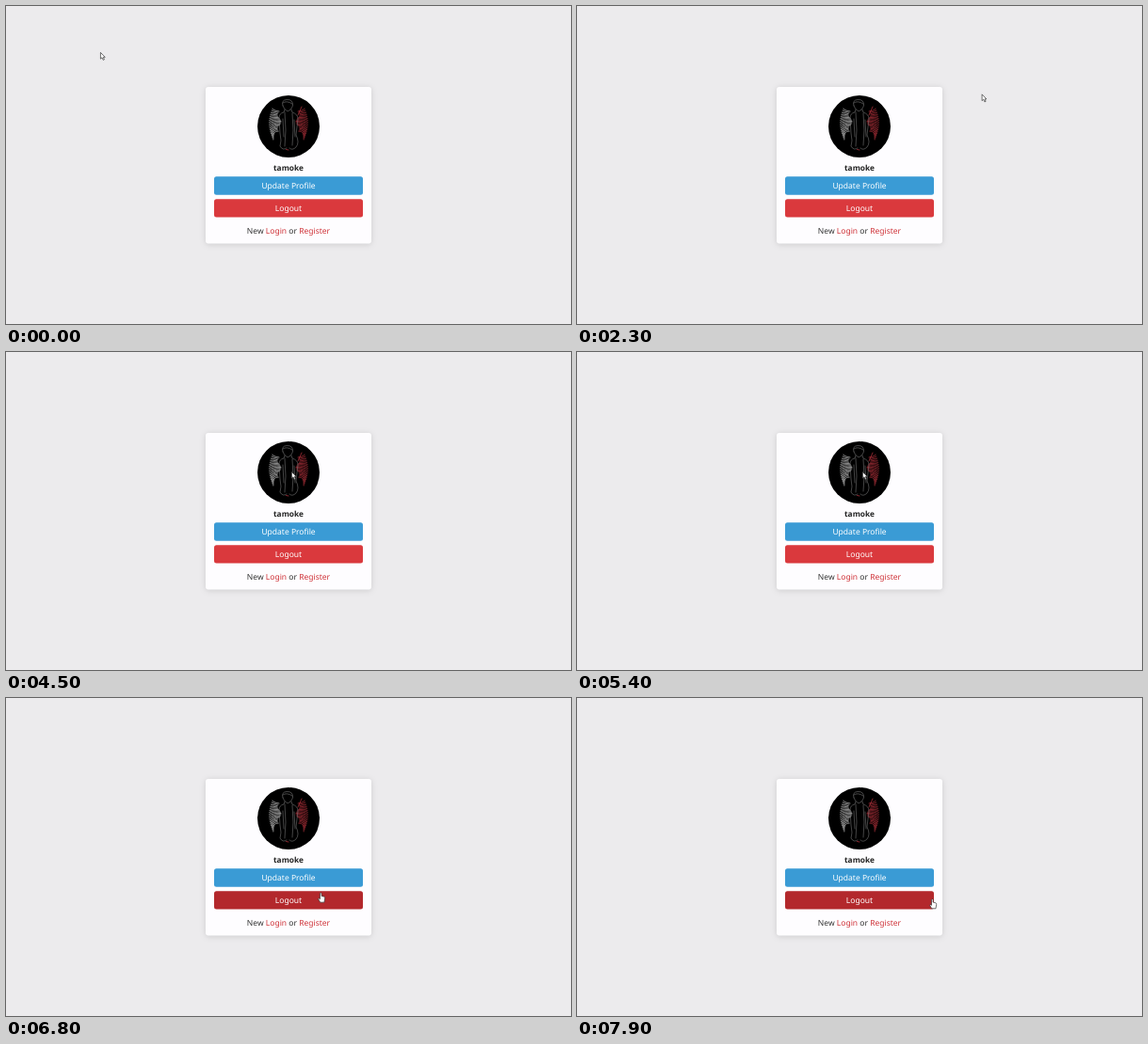
An HTML page for the animation above (8000 ms loop, 600 by 338 pixels).

```html
<!DOCTYPE html>
<html lang="en">
<head>
<meta charset="utf-8">
<title>Profile card</title>
<style>
  html, body { margin: 0; width: 100%; height: 100%; overflow: hidden; background: #ecebed; }
  svg { display: block; width: 600px; height: 338px; }
  text { font: 500 8.5px "Noto Sans", "Open Sans", sans-serif; text-anchor: middle; fill: #fff; text-rendering: geometricPrecision; }
  .card { fill: #fefdff; filter: drop-shadow(0 1px 3px rgba(0, 0, 0, .13)); }
  .name { font-weight: 700; font-size: 8.3px; fill: #222; }
  .links { font-weight: 400; fill: #333; }
  .links tspan { fill: #cf3339; }
  .update { fill: #3a9bd5; }
  .update.hover { fill: #2d82b5; }
  .logout { fill: #da393d; }
  .logout.hover { fill: #b3282c; }
  .art { fill: none; stroke-linecap: round; stroke-linejoin: round; }
  .pointer { fill: #fff; stroke: #333; stroke-width: .7; stroke-linejoin: round; }
</style>
</head>
<body>
<svg viewBox="0 0 600 338">
  <rect class="card" x="212" y="86" width="176" height="166.5" rx="3"/>
  <circle cx="300" cy="128" r="33"/>
  <g class="art">
    <path id="whiteWing" stroke="#d4d4d4" stroke-width=".65"/>
    <path id="redWing" stroke="#a92f39" stroke-width=".75"/>
    <g stroke="#8b8b8b" stroke-width=".5">
      <path d="M294 106Q292 100 298 99.500Q305 99 304.500 106Q303 111 299 112Q295 110 294 106M294 103Q298 100 304 104"/>
      <path d="M296 110L295 113Q290 114 290 119L291 135Q293 144 291 149Q294 154 298 151M303 110L304 113Q310 115 310 120L308 137Q312 145 308 150Q304 154 301 151"/>
      <path d="M296 113L297 132L296 149M304 114L305 132L304 148M294 120L295 139M306 121L307 139"/>
    </g>
    <path d="M310 116L314 107M297.500 152.500L300 153" stroke="#a92f39" stroke-width=".8"/>
  </g>
  <text class="name" x="300" y="174.600">tamoke</text>
  <rect class="update" x="221" y="181.300" width="158" height="19.500" rx="2.500"/>
  <text x="300" y="194">Update Profile</text>
  <rect class="logout" x="221" y="205.200" width="158" height="19.300" rx="2.500"/>
  <text x="300" y="217.800">Logout</text>
  <text class="links" x="300" y="241.700">New <tspan>Login</tspan> or <tspan>Register</tspan></text>
  <g class="pointer">
    <path id="arrow" d="M.4 .4V7.200L2 5.800L3.200 8.400L4.400 7.900L3.300 5.400H5.200Z"/>
    <path id="hand" d="M-.8 .8Q0 -.4 .8 .8V3.600L3.700 4.300Q4.600 4.600 4.400 6L3.700 10.300H-.6L-2.700 6.700Q-2.300 5.600 -.8 6.800Z"/>
  </g>
</svg>
<script>
  const LOOP = 8000, STEP = 100;
  // time, x, y of the pointer tip
  const path = [
    [0, 100, 49], [1000, 100, 49], [1250, 175, 49.5], [1900, 175, 49.5],
    [2600, 595, 122], [2800, 595, 122], [3200, 490, 131], [3600, 460, 121],
    [3900, 420, 75], [4400, 303, 127], [5450, 303, 127], [5800, 319, 188.5],
    [6400, 319.5, 188.5], [6900, 336, 209], [7400, 345.7, 209.5], [7900, 377.3, 213.5]
  ];
  const $ = s => document.querySelector(s);
  const arrow = $('#arrow'), hand = $('#hand'), update = $('.update'), logout = $('.logout');

  // Feathers fan out from the shoulder and hang down along the wing.
  function wing(side) {
    let d = '';
    for (let i = 0; i < 17; i++) {
      const u = i / 16;
      const x = 300 + side * (10 + 2 * Math.sin(u * 9));
      const y = 112 + u * 21;
      const tipX = 300 + side * (14 + 6.5 * Math.sin(.5 + u * 2.3));
      const tipY = 109 + u * 33;
      d += `M${x} ${y}Q${300 + side * 17} ${y - 1} ${tipX} ${tipY}`;
    }
    return d;
  }
  $('#whiteWing').setAttribute('d', wing(-1));
  $('#redWing').setAttribute('d', wing(1));

  function pointerAt(t) {
    const i = path.findIndex(p => p[0] > t);
    if (i < 0) return path[path.length - 1].slice(1);
    const [t0, x0, y0] = path[i - 1], [t1, x1, y1] = path[i];
    let k = (t - t0) / (t1 - t0);
    k = k * k * (3 - 2 * k);
    return [x0 + (x1 - x0) * k, y0 + (y1 - y0) * k];
  }

  function draw(now) {
    const t = Math.floor(now % LOOP / STEP) * STEP;
    const [x, y] = pointerAt(t);
    const inside = (top, bottom) => x > 221 && x < 379 && y >= top && y <= bottom;
    const onUpdate = inside(181.3, 200.8), onLogout = inside(205.2, 224.5);
    const clickable = onUpdate || onLogout;
    update.classList.toggle('hover', onUpdate);
    logout.classList.toggle('hover', onLogout);
    arrow.style.display = clickable ? 'none' : '';
    hand.style.display = clickable ? '' : 'none';
    (clickable ? hand : arrow).setAttribute('transform', `translate(${x} ${y})`);
    requestAnimationFrame(draw);
  }
  const start = performance.now();
  requestAnimationFrame(function first() { draw(0); });
  function tick() { requestAnimationFrame(tick); }
</script>
</body>
</html>
```
